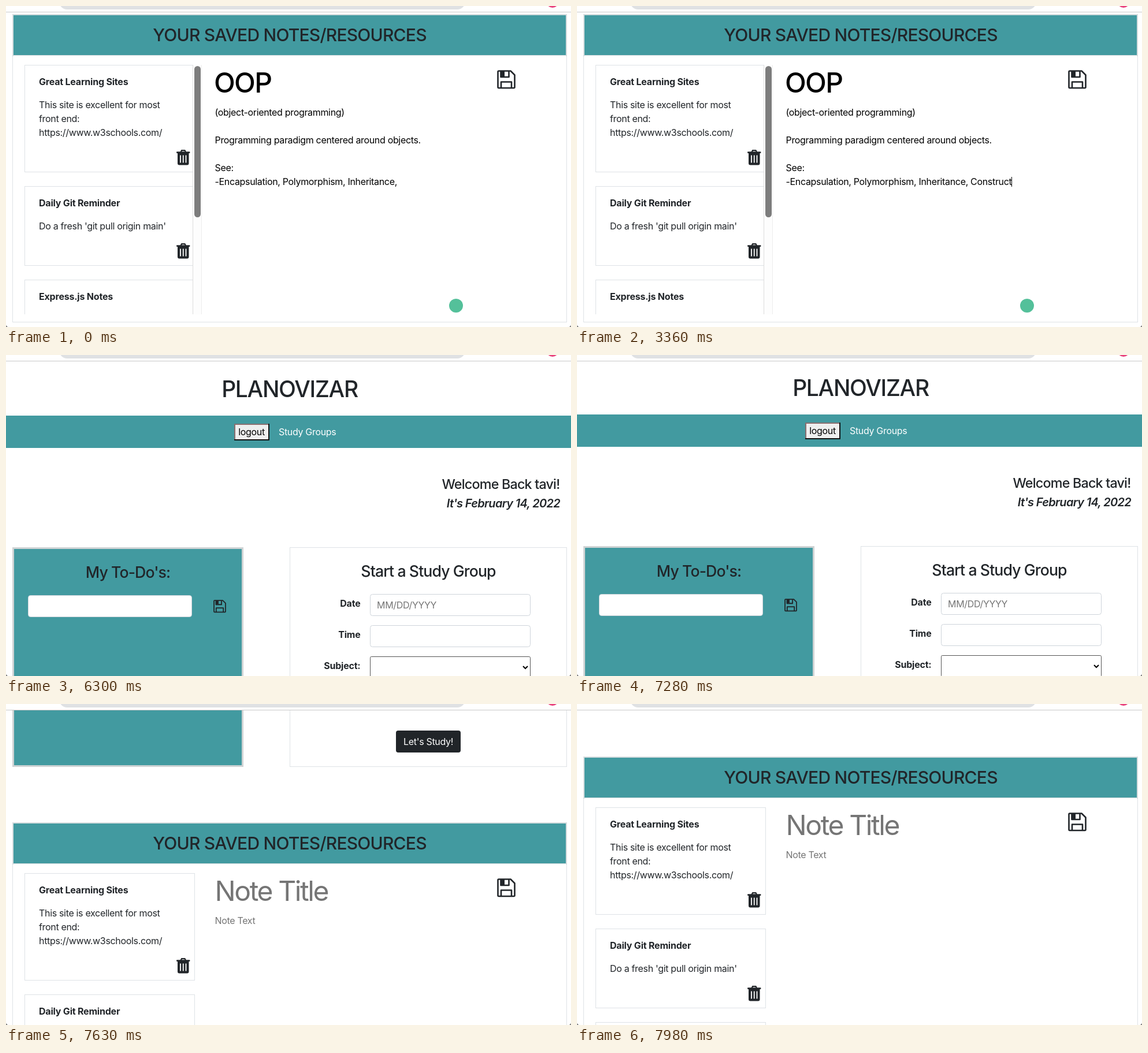
An HTML page that plays this animation: 978x556 px, repeating every 8 s.

```html
<!DOCTYPE html>
<html lang="en">
<head>
<meta charset="utf-8">
<title>Saved notes</title>
<style>
  html, body { margin: 0; width: 100%; height: 100%; overflow: hidden; background: #fff; }
  svg { display: block; position: absolute; left: 0; top: 0; }
  text {
    font: 400 16px Inter, "Liberation Sans", sans-serif;
    font-optical-sizing: none;
    letter-spacing: -.0205em;
    white-space: pre;
    fill: #212529;
  }
  .bold { font-weight: 700; letter-spacing: -.013em; }
  .h1, .h2, .h3, .h4, .h5 { font-weight: 500; letter-spacing: -.034em; }
  .h1 { font-size: 39px; }
  .h2 { font-size: 30px; letter-spacing: -.026em; }
  .h3 { font-size: 26.67px; }
  .h4 { font-size: 23.3px; }
  .h5 { font-size: 20px; font-style: italic; font-weight: 600; }
  .title { font-size: 48px; font-weight: 450; letter-spacing: -.035em; }
  .title.hint { font-weight: 400; letter-spacing: -.05em; }
  .black { fill: #000; }
  .white { fill: #fff; }
  .hint { fill: #757575; }
  .link { fill: #1f72d8; text-decoration: underline; }
  .mid { text-anchor: middle; }
  .end { text-anchor: end; }
</style>
</head>
<body>
<svg id="stage" width="978" height="556" viewBox="0 0 978 556"></svg>
<script>
const TEAL = '#429aa0', INK = '#212529', LINE = '#dee2e6';
const LOOP = 8000, STEP = 70;
const NOTES_TOP = 917;

const label = (x, y, str, cls = '') => `<text x="${x}" y="${y}" class="${cls}">${str}</text>`;
const rect = (x, y, w, h, fill, extra = '') =>
  `<rect x="${x}" y="${y}" width="${w}" height="${h}" fill="${fill}" ${extra}/>`;
const frame = (x, y, w, h, stroke = LINE, r = 0, fill = '#fff') =>
  rect(x + .5, y + .5, w - 1, h - 1, fill, `stroke="${stroke}" rx="${r}"`);
const field = y => frame(630, y, 278, 38, '#ced4da', 4);
const select = y => frame(630, y, 278, 38, '#555', 2) +
  `<path d="M895 ${y + 17}l4 4 4-4" fill="none" stroke="#000" stroke-width="2"/>`;

const saveIcon = (x, y, size) => `
  <g transform="translate(${x} ${y}) scale(${size / 32})" fill="none" stroke="${INK}" stroke-width="2.6" stroke-linejoin="round">
    <path d="M3 1.5H23.5L30.5 8.5V29.5Q30.5 31 29 31H3Q1.5 31 1.5 29.5V3Q1.5 1.5 3 1.5Z"/>
    <path d="M6.5 2V12H20.5V2M7 31V20.5H25V31"/>
    <path d="M7 2h6v9h-6z" fill="${INK}" stroke="none"/>
  </g>`;

const trashIcon = (x, y) => `
  <g transform="translate(${x} ${y})">
    <path d="M7.5 4L9 1.2H14.5L16 4" fill="none" stroke="${INK}" stroke-width="2.2"/>
    <path d="M1 3.3H22.5Q23.5 3.3 23.5 4.5T22.5 5.9H1Q0 5.9 0 4.6T1 3.3Z
      M2 5.5H21.5V23.5Q21.5 26.5 18.5 26.5H5Q2 26.5 2 23.5Z" fill="${INK}"/>
    <path d="M7 9.5V22.5M11.75 9.5V22.5M16.5 9.5V22.5" stroke="#fff" stroke-width="1.8"/>
  </g>`;

const card = (y, h, title, lines) =>
  frame(32, y, 295, h) + label(57, y + 35, title, 'bold') +
  lines.map((s, i) => label(57, y + 75 + 24 * i, s)).join('') +
  trashIcon(295, y + h - 39);

const topPage = `
  ${label(491, 71, 'PLANOVIZAR', 'h1 mid')}
  ${rect(0, 103, 978, 56, TEAL)}
  ${rect(395, 117, 61, 29, '#efefef')}
  <path d="M396 146V118H455" fill="none" stroke="#8a6f70" stroke-width="2"/>
  <path d="M395 145H455V117" fill="none" stroke="#111" stroke-width="2"/>
  ${label(425, 137, 'logout', 'black mid')}
  ${label(472, 137, 'Study Groups', 'white')}
  ${label(958.5, 230, 'Welcome Back tavi!', 'h4 end')}
  ${label(959, 262, "It's February 14, 2022", 'h5 end')}

  ${rect(12.5, 332.5, 397, 501, TEAL, 'stroke="#cfd3d4" stroke-width="3"')}
  ${label(211, 384, "My To-Do's:", 'h3 mid')}
  ${frame(38, 414, 284, 38, '#ced4da', 4)}
  ${saveIcon(359, 422, 22)}

  ${frame(491, 331, 480, 504)}
  ${label(731, 382, 'Start a Study Group', 'h3 mid')}
  ${[['Date', 434], ['Time', 488], ['Subject:', 542], ['Studying', 596], ['Style:', 620]]
    .map(([s, y]) => label(613.5, y, s, 'bold end')).join('')}
  ${field(412)}${field(466)}${select(520)}${select(574)}${field(694)}
  ${label(642, 437, 'MM/DD/YYYY', 'hint')}
  ${label(642, 599, 'What do you prefer?', 'black')}
  ${label(574, 680, 'Click Here to generate a virtual meeting link', 'bold link')}
  ${label(617, 716, 'Location/Link:', 'bold end')}
  ${rect(675, 772, 112, 38, INK, 'rx="4"')}
  ${label(731, 797, "Let's Study!", 'white mid')}`;

const notes = `
  ${frame(11, 14, 960, 534)}
  ${rect(12, 15, 958, 71, TEAL, 'stroke="#d5dcde" stroke-width="2"')}
  ${rect(13, 85, 956, 2, '#fff')}
  ${rect(13, 85, 956, 1, '#d5dcde')}
  ${label(491, 61, 'YOUR SAVED NOTES/RESOURCES', 'h2 mid')}
  <g clip-path="url(#list)">
    ${card(102, 186, 'Great Learning Sites', ['This site is excellent for most', 'front end:', 'https://www.w3schools.com/'])}
    ${card(312, 138, 'Daily Git Reminder', ["Do a fresh 'git pull origin main'"])}
    ${card(474, 138, 'Express.js Notes', [])}
  </g>
  <g id="blank">
    ${label(361.5, 150, 'Note Title', 'title hint')}
    ${label(361.5, 190, 'Note Text', 'hint')}
  </g>
  <g id="draft">
    ${rect(324, 102, 15, 432, '#fdfdfd')}
    ${rect(323, 102, 1, 432, '#dcdcdc')}
    ${rect(338, 102, 1, 432, '#ececec')}
    ${rect(326, 104, 11, 262, '#7d7d7d', 'rx="5.5"')}
    ${label(360, 150, 'OOP', 'title black')}
    ${label(361.5, 190, '(object-oriented programming)', 'black')}
    ${label(361.5, 238, 'Programming paradigm centered around objects.', 'black')}
    ${label(361.5, 286, 'See:', 'black')}
    <text id="typed" x="361.5" y="310" class="black"></text>
    <rect id="caret" y="296" width="1" height="17"/>
    <rect id="ring" fill="none" stroke="#c3daf9" rx="5"/>
    <circle id="helper" cx="779" cy="519" r="12" fill="#54c09a"/>
  </g>
  ${saveIcon(850, 111, 32)}`;

const browserEdge = `
  ${rect(0, 0, 978, 11, '#fff')}
  ${rect(92, -24, 703, 30, '#dfe1e3', 'rx="14"')}
  <circle cx="946" cy="-7.5" r="10.5" fill="#e8417c"/>
  ${rect(0, 10, 978, 1, '#c9c9c9')}
  <path d="M0 553V556H3ZM978 553V556H975Z" fill="#777"/>`;

document.getElementById('stage').innerHTML = `
  <clipPath id="list"><rect x="32" y="102" width="296" height="432"/></clipPath>
  <g id="page">${topPage}<g transform="translate(0 ${NOTES_TOP})">${notes}</g></g>
  ${browserEdge}`;

const [page, blank, draft, typed, caret, ring, helper] =
  ['page', 'blank', 'draft', 'typed', 'caret', 'ring', 'helper'].map(id => document.getElementById(id));

const LEAD = '-Encapsulation, Polymorphism, Inheritance, ';
const WORD = 'Constructors';
const KEY_TIMES = [1820, 2030, 2170, 2310, 2520, 2800, 2940, 3080, 3360, 3430, 3570, 3710];
const BLUR = 5250;
const CARET_ON = [[910, 1400], [1820, 4200], [4760, BLUR]];
const RELOAD = 6230, SCROLL_START = 7280;
const SCROLL = [0, 50, 180, 344, 560, 726, 790, 820, 833, 838, 840];

const show = (el, on) => el.setAttribute('visibility', on ? 'visible' : 'hidden');
const setAll = (el, attrs) => Object.entries(attrs).forEach(([k, v]) => el.setAttribute(k, v));

function scrollAt(t) {
  if (t < RELOAD) return NOTES_TOP;
  if (t < SCROLL_START) return -2;
  return SCROLL[Math.min(SCROLL.length - 1, Math.floor((t - SCROLL_START) / STEP))];
}

function draw(t) {
  const editing = t < RELOAD;
  page.setAttribute('transform', `translate(0 ${-scrollAt(t)})`);
  show(draft, editing);
  show(blank, !editing);
  show(helper, t < BLUR);

  typed.textContent = LEAD + WORD.slice(0, KEY_TIMES.filter(k => k <= t).length);
  show(caret, CARET_ON.some(([on, off]) => t >= on && t < off));
  caret.setAttribute('x', Math.round(361.5 + typed.getComputedTextLength()));

  const grow = Math.min(1, Math.max(0, (t - BLUR) / 150));
  show(ring, editing && grow > 0);
  setAll(ring, {
    x: 837 - 2 * grow, y: 102 - 2 * grow,
    width: 57 + 4 * grow, height: 51 + 4 * grow,
    'stroke-width': 4 * grow
  });
}

const start = performance.now();
function tick() {
  const t = (performance.now() - start) % LOOP;
  draw(Math.floor(t / STEP) * STEP);
  requestAnimationFrame(tick);
}
tick();
</script>
</body>
</html>
```
